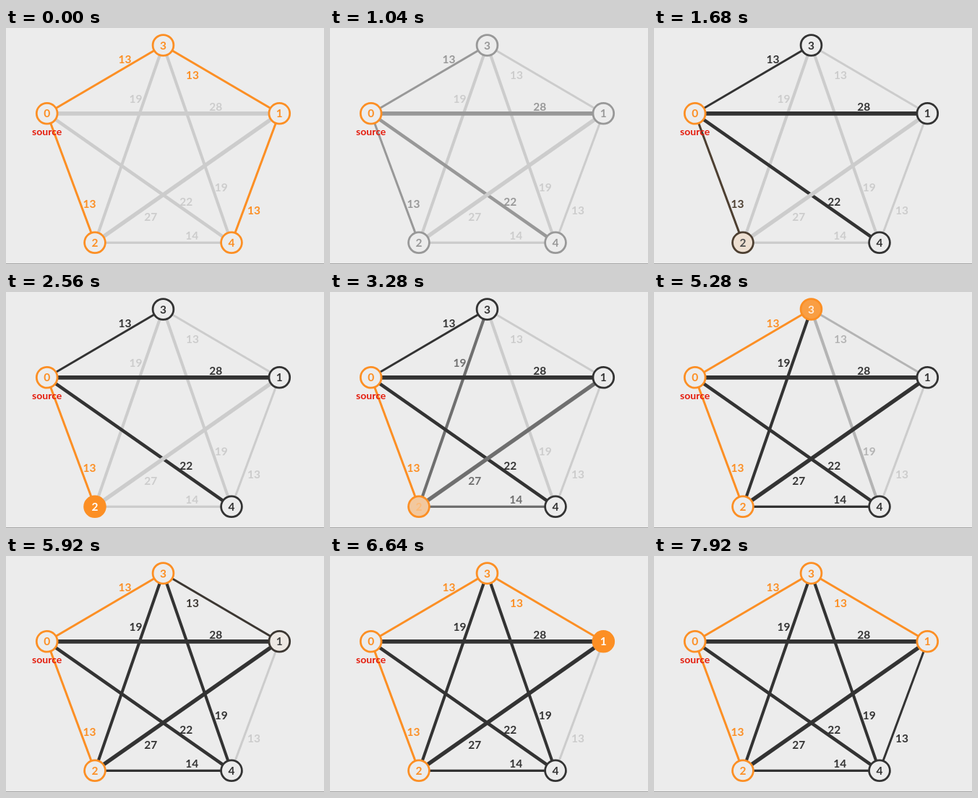
An HTML page that plays this animation: 440 by 328 pixels, repeating every 8000 ms.

```html
<!DOCTYPE html>
<html lang="en">
<head>
<meta charset="utf-8">
<title>Minimum spanning tree</title>
<style>
  html, body { margin: 0; width: 100%; height: 100%; overflow: hidden; background: #ececec; }
  svg { display: block; width: 440px; height: 328px; }
  text { font: 700 15.5px Lato, "Open Sans", sans-serif; text-anchor: middle; }
  .source { font-size: 14px; fill: #e41b0b; }
</style>
</head>
<body>
<svg id="stage" viewBox="0 0 440 328"></svg>
<script>
const LOOP = 8000, TICK = 80, FADE = 500, STEP = 700;
const RESET = 120;
const QUEUE = [820, 3010, 5110, 7210]; // when each visited node offers its edges

const BG = [236, 236, 236], LIGHT = [204, 204, 204], DARK = [51, 51, 51];
const ORANGE = [252, 143, 36], WHITE = [255, 255, 255];

// Node looks: fill, ring, digit
const OFF = [BG, LIGHT, LIGHT];
const QUEUED = [BG, DARK, DARK];
const ACTIVE = [ORANGE, ORANGE, WHITE];
const DONE = [BG, ORANGE, ORANGE];

// The pentagon is symmetric about x = MID
const MID = 217.5;
const nodes = [[-160.8, 118.8], [160.8, 118.8], [-94.5, 298.3], [0, 24], [94.5, 298.3]]
  .map(([x, y]) => [MID + x, y]);

// Weights of 0-1, 0-2, ... 3-4; heavier edges lie on top
const weights = [28, 13, 13, 22, 27, 13, 13, 19, 14, 19];
const edges = [];
for (let a = 0; a < 5; a++) {
  for (let b = a + 1; b < 5; b++) edges.push({ a, b, weight: weights[edges.length] });
}
edges.sort((p, q) => p.weight - q.weight);

// Prim's algorithm gives the visiting order and the tree
const order = [0];
while (order.length < nodes.length) {
  const next = edges.find(e => order.includes(e.a) !== order.includes(e.b));
  next.inTree = true;
  order.push(order.includes(next.a) ? next.b : next.a);
}
const queueTime = n => QUEUE[order.indexOf(n)] ?? Infinity;
const joinTime = n => n === 0 ? RESET : QUEUE[order.indexOf(n) - 1] + STEP;

function edgeTrack({ a, b, inTree }) {
  const track = [
    [0, [inTree ? ORANGE : LIGHT]],
    [RESET, [LIGHT]],
    [Math.min(queueTime(a), queueTime(b)), [DARK]]
  ];
  if (inTree) track.push([Math.max(joinTime(a), joinTime(b)), [ORANGE]]);
  return track;
}

function nodeTrack(n) {
  if (n === 0) return [[0, DONE]];
  return [[0, DONE], [RESET, OFF], [QUEUE[0], QUEUED], [joinTime(n), ACTIVE], [queueTime(n), DONE]];
}

const rgb = c => `rgb(${c.map(Math.round).join()})`;
const mix = (a, b, p) => a.map((v, i) => v + (b[i] - v) * p);
const ease = t => t < 0.5 ? 4 * t ** 3 : 1 - 4 * (1 - t) ** 3;

function look(track, t) {
  let colors = track[0][1];
  for (const [start, next] of track.slice(1)) {
    if (t <= start) break;
    const p = ease(Math.min(1, (t - start) / FADE));
    colors = colors.map((c, i) => mix(c, next[i], p));
  }
  return colors.map(rgb);
}

const stage = document.getElementById("stage");
function add(tag, attrs, label = "") {
  const el = document.createElementNS("http://www.w3.org/2000/svg", tag);
  for (const key in attrs) el.setAttribute(key, attrs[key]);
  el.textContent = label;
  return stage.appendChild(el);
}

// Labels sit near three quarters of the edge, to its left
function labelSpot([x1, y1], [x2, y2]) {
  const len = Math.hypot(x2 - x1, y2 - y1);
  const ux = (x2 - x1) / len, uy = (y2 - y1) / len;
  const along = 0.75 * len - 7.6, side = 12.5;
  return { x: x1 + ux * along + uy * side, y: y1 + uy * along - ux * side + 8.3 };
}

add("rect", { width: 440, height: 328, fill: rgb(BG) });
add("rect", { y: 327, width: 440, height: 1, fill: "#a6a6a6" });

for (const e of edges) {
  const [x1, y1] = nodes[e.a], [x2, y2] = nodes[e.b];
  e.line = add("line", { x1, y1, x2, y2, "stroke-width": 3 + (e.weight - 13) * 0.18 });
  e.track = edgeTrack(e);
}
for (const e of edges) e.label = add("text", labelSpot(nodes[e.a], nodes[e.b]), e.weight);

const discs = nodes.map(([cx, cy], n) => ({
  ring: add("circle", { cx, cy, r: 14.4, "stroke-width": 2.8 }),
  digit: add("text", { x: cx, y: cy + 5.5 }, n),
  track: nodeTrack(n)
}));
add("text", { x: nodes[0][0], y: 149, class: "source" }, "source");

function draw(t) {
  for (const { line, label, track } of edges) {
    const [color] = look(track, t);
    line.setAttribute("stroke", color);
    label.setAttribute("fill", color);
  }
  for (const { ring, digit, track } of discs) {
    const [fill, stroke, ink] = look(track, t);
    ring.setAttribute("fill", fill);
    ring.setAttribute("stroke", stroke);
    digit.setAttribute("fill", ink);
  }
}

const begin = performance.now();
function frame() {
  const t = (performance.now() - begin) % LOOP;
  draw(Math.floor(t / TICK) * TICK);
  requestAnimationFrame(frame);
}
frame();
</script>
</body>
</html>
```
